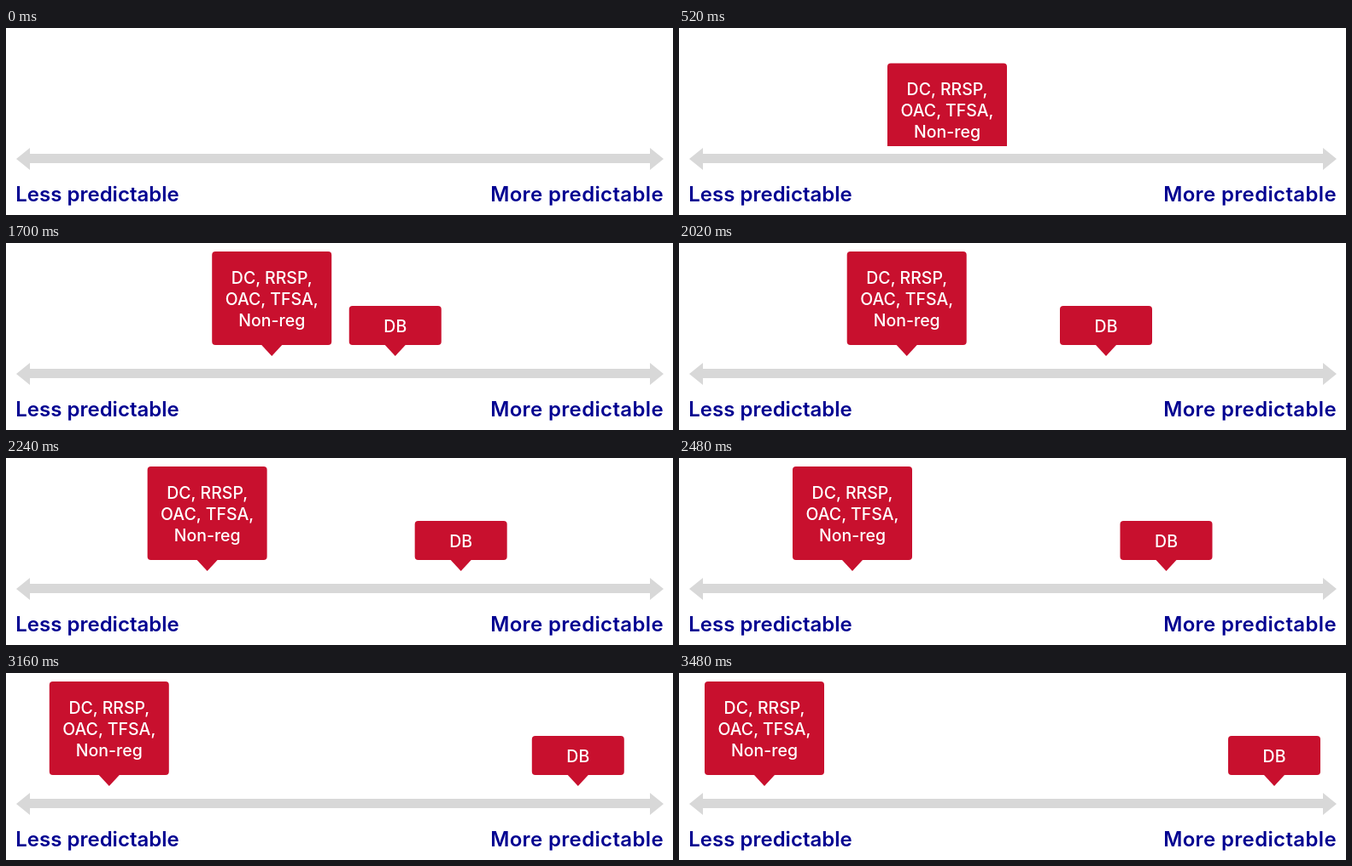
An HTML page for the animation above (3720 ms loop, 781 by 220 pixels).

```html
<!DOCTYPE html>
<html lang="en">
<head>
<meta charset="utf-8">
<title>Predictability scale</title>
<style>
html, body { margin: 0; width: 100%; height: 100%; overflow: hidden; background: #fff; }
svg { display: block; width: 781px; height: 220px; }
text { font-family: Inter, "Open Sans", sans-serif; }
.label { font-size: 24px; font-weight: 600; fill: #000091; }
.tag { fill: #c8102e; }
.tag text { font-size: 19.5px; font-weight: 500; fill: #fff; text-anchor: middle; }
</style>
</head>
<body>
<svg viewBox="0 0 781 220">
  <defs><clipPath id="above"><rect width="781" height="139"/></clipPath></defs>
  <path fill="#d8d8d8" d="M12 154 28 141V148H754V141L770 154 754 167V159H28V167Z"/>
  <text class="label" x="11.3" y="204">Less predictable</text>
  <text class="label" x="770" y="204" text-anchor="end" letter-spacing="0.35">More predictable</text>
  <g clip-path="url(#above)">
    <g class="tag" id="plans">
      <rect x="-70" y="10" width="140" height="110" rx="4"/>
      <path d="M-12 119.5H12V120L0 133-12 120Z"/>
      <text y="48">DC, RRSP,</text>
      <text y="73">OAC, TFSA,</text>
      <text y="98">Non-reg</text>
    </g>
    <g class="tag" id="pension">
      <rect x="-54" y="74" width="108" height="46" rx="4"/>
      <path d="M-12 119.5H12V120L0 133-12 120Z"/>
      <text y="105">DB</text>
    </g>
  </g>
</svg>
<script>
const LOOP = 3720, STEP = 20;
const plans = document.getElementById('plans');
const pension = document.getElementById('pension');

// Time, distance travelled left by the first tag, right by the second
const slide = [
  [1680, 0, 0], [2020, 47.3, 47], [2220, 75.6, 76.6], [2480, 111, 117.5],
  [2760, 148.6, 160.5], [2860, 160.5, 176], [3300, 206.6, 233.6], [3480, 214, 244]
];
const last = slide.length - 1;

function slope(i, k) {
  if (i === last) return 0;
  const a = slide[Math.max(i - 1, 0)], b = slide[i + 1];
  return (b[k] - a[k]) / (b[0] - a[0]);
}

// Smooth Hermite curve through the slide points
function travel(t, k) {
  if (t <= slide[0][0]) return 0;
  if (t >= slide[last][0]) return slide[last][k];
  const i = slide.findIndex(p => p[0] > t) - 1;
  const a = slide[i], b = slide[i + 1], h = b[0] - a[0];
  const u = (t - a[0]) / h, v = 1 - u;
  return v * v * (1 + 2 * u) * a[k] + u * u * (3 - 2 * u) * b[k]
    + h * u * v * (v * slope(i, k) - u * slope(i + 1, k));
}

function drop(t, start, end, height) {
  const p = Math.min(Math.max((t - start) / (end - start), 0), 1);
  return height * (1 - p);
}

function place(el, x, y) {
  el.setAttribute('transform', `translate(${x.toFixed(2)} ${y.toFixed(2)})`);
}

function draw(ms) {
  const t = Math.floor((ms % LOOP) / STEP) * STEP;
  place(plans, 314 - travel(t, 1), drop(t, 100, 655, 129));
  place(pension, 453 + travel(t, 2), drop(t, 600, 880, 65));
}

const begin = performance.now();
function tick() {
  draw(performance.now() - begin);
  requestAnimationFrame(tick);
}
tick();
</script>
</body>
</html>
```
